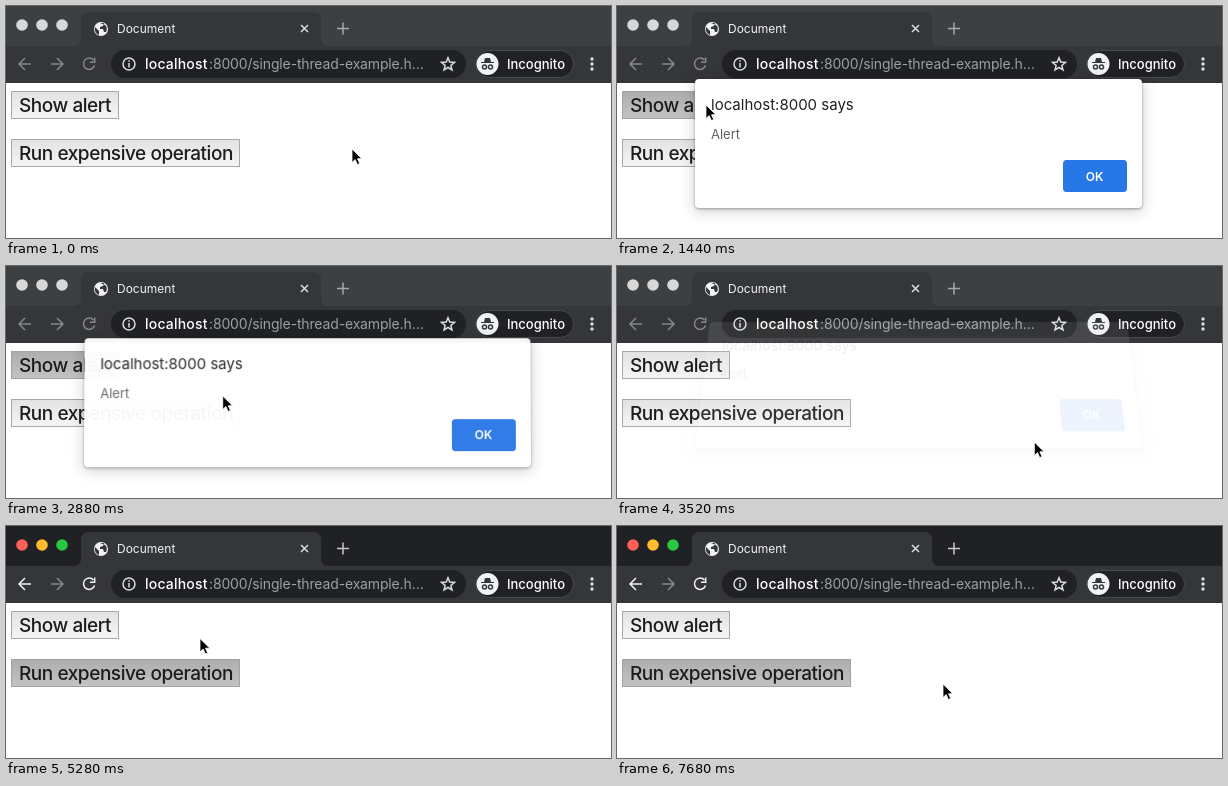
These frames come from a looping animation (605x232 px, 8000 ms). An HTML page:

```html
<!DOCTYPE html>
<html lang="en">
<head>
<meta charset="utf-8">
<title>Blocked page</title>
<style>
  html, body { margin: 0; width: 100%; height: 100%; overflow: hidden; background: #fff; }
  svg { position: absolute; left: 0; top: 0; overflow: visible; }
  text { font-family: Inter, "Open Sans", sans-serif; white-space: pre; }
  .line { fill: none; stroke: #dadce0; stroke-width: 1.5; }
  .bar { fill: #202124; }
  .nav { stroke: #f1f3f4; }
  .dim { stroke: #85878a; }
  .plus { stroke: #c6c8ca; }
  .idle .bar { fill: #3c4043; }
  .idle .nav { stroke: #85878a; }
  .idle .plus { stroke: #a5a8ab; }
  .idle .light { fill: #d8d8d8; }
  .button rect { fill: url(#up); stroke: #a8a8a8; }
  .button.pressed rect { fill: url(#down); stroke: #a2a2a2; }
  .button text { font-size: 19px; font-weight: 450; letter-spacing: -.45px; fill: #1c1c1c; }
  #dialog {
    position: absolute; left: 78px; top: 73px; width: 447px; height: 129px;
    background: #fff; border-radius: 4px; transform-origin: 50% 100%;
    box-shadow: 0 1px 3px rgba(0,0,0,.35), 0 3px 14px 2px rgba(0,0,0,.15);
  }
</style>
</head>
<body>
<svg width="605" height="232">
  <defs>
    <linearGradient id="up" x2="0" y2="1"><stop stop-color="#e2e2e2"/><stop offset="1" stop-color="#f5f5f5"/></linearGradient>
    <linearGradient id="down" x2="0" y2="1"><stop stop-color="#adadad"/><stop offset="1" stop-color="#c3c3c3"/></linearGradient>
    <path id="arrow" d="M6 0H-6M0-6L-6 0 0 6"/>
  </defs>

  <rect class="bar" width="605" height="40"/>
  <circle class="light" cx="16" cy="19" r="5.8" fill="#fe5f57"/>
  <circle class="light" cx="36" cy="19" r="5.8" fill="#febc2e"/>
  <circle class="light" cx="56" cy="19" r="5.8" fill="#28c840"/>
  <path fill="#35363a" d="M67 40Q75 40 75 32V14Q75 6 83 6H307Q315 6 315 14V32Q315 40 323 40H605V77H0V40Z"/>

  <circle cx="95" cy="23" r="7" fill="#f1f3f4"/>
  <path fill="#35363a" d="M89 21L93 25V29Q88 27 89 21ZM94 17H98L97 20 94 21V23H97L98 26H100Q102 21 99 19Z"/>
  <text x="111" y="27" font-size="12" fill="#f1f3f4">Document</text>
  <path class="line" d="M295 19l7 7m0-7l-7 7"/>
  <path class="line plus" d="M331 22.500h12m-6-6v12"/>

  <use class="line nav" href="#arrow" x="19" y="58"/>
  <use class="line dim" href="#arrow" transform="translate(51 58) scale(-1 1)"/>
  <path class="line nav" d="M87.500 54A5.700 5.700 0 1 0 88.600 59.500M88.700 51.500V56.300H84"/>

  <rect x="105" y="44" width="355" height="28" rx="14" fill="#202124"/>
  <circle class="line" cx="123" cy="58" r="6"/>
  <path class="line" d="M123 57v4.500m0-7.200v1.500"/>
  <text x="139" y="63" font-size="14" font-weight="500" letter-spacing=".2" fill="#fff">localhost</text>
  <text x="203" y="63" font-size="14" letter-spacing="-.15" fill="#9aa0a6">:8000/single-thread-example.h…</text>
  <polygon class="line" id="star" transform="translate(442 58.500)"/>

  <rect x="469.500" y="44.500" width="98" height="27" rx="13.500" fill="#202124" stroke="#46484c"/>
  <circle cx="481.500" cy="58" r="11" fill="#f1f3f4"/>
  <path fill="#35363a" d="M478 56l1-4h5l1 4zM475 56h13v1h-13z"/>
  <g class="line" style="stroke: #35363a">
    <circle cx="478.500" cy="61" r="2"/><circle cx="484.500" cy="61" r="2"/>
  </g>
  <text x="501" y="63" font-size="13" font-weight="450" fill="#fff">Incognito</text>
  <path class="line" d="M586 53v11" style="stroke-width: 3.4; stroke-linecap: round; stroke-dasharray: 0 5"/>

  <g class="button" id="show">
    <rect x="5.500" y="85.500" width="107" height="27"/>
    <text x="13" y="106">Show alert</text>
  </g>
  <g class="button" id="run">
    <rect x="5.500" y="133.500" width="228" height="27"/>
    <text x="13" y="154">Run expensive operation</text>
  </g>
</svg>

<div id="dialog">
  <svg width="447" height="129">
    <text x="16" y="31" font-size="15" fill="#202124">localhost:8000 says</text>
    <text x="16" y="60" font-size="13" fill="#5f6368">Alert</text>
    <rect x="368" y="81" width="64" height="32" rx="3.500" fill="#2877e6"/>
    <text x="399.500" y="101.500" font-size="12" font-weight="600" fill="#fff" text-anchor="middle">OK</text>
  </svg>
</div>

<svg width="605" height="232">
  <path id="cursor" stroke="#fff" stroke-width=".8" d="M0 1V14.500L3.200 11.500 5.400 16.500 7.700 15.500 5.500 10.700H9.800Z"/>
</svg>

<script>
const STEP = 160, LOOP = 8000, FADE = 200;
const [show, run, dialog, cursor, star] =
  ['show', 'run', 'dialog', 'cursor', 'star'].map(id => document.getElementById(id));

const rest = { x: 346, y: 142 };
const alerts = [{ open: 1200, close: 2040 }, { open: 2720, close: 3320 }];

// Pointer moves, each easing on from where the last one ended
const moves = [
  { at: 400, ms: 560, x: 89, y: 98 },
  { at: 1440, ms: 480, x: 472, y: 170 },
  { at: 2040, ms: 520, x: 89, y: 102 },
  { at: 2640, ms: 620, x: 472, y: 183 },
  { at: 3320, ms: 680, x: 210, y: 145 },
  { at: 4320, ms: 480, x: 367, y: 125 },
  { at: 4800, ms: 960, x: 21, y: 98 },
  { at: 5760, ms: 320, x: 201, y: 113 },
  { at: 6080, ms: 320, x: 100, y: 104 },
  { at: 6400, ms: 320, x: 71, y: 100 },
  { at: 6880, ms: 800, x: 326, y: 157 }
];

const clamp = k => Math.min(1, Math.max(0, k));
const ease = k => k * k * (3 - 2 * k);

function pointer(t) {
  let { x, y } = rest;
  for (const move of moves) {
    const k = ease(clamp((t - move.at) / move.ms));
    x += (move.x - x) * k;
    y += (move.y - y) * k;
  }
  return [x, y];
}

// The dialog unfolds as it opens and tips back as it closes
function drawDialog(t, { open, close }) {
  const fold = t < close ? (1 - clamp((t - open) / FADE)) ** 2 : clamp((t - close) / FADE);
  dialog.style.opacity = 1 - .91 * fold;
  dialog.style.transform = fold
    ? `translateY(${-20 * fold}px) perspective(300px) rotateX(${9 * fold}deg) scaleY(${1 + .06 * fold})`
    : 'none';
}

function draw(now) {
  const t = Math.floor(now % LOOP / STEP) * STEP;
  const alert = alerts.find(a => t >= a.open && t <= a.close + FADE);

  document.body.classList.toggle('idle', t < STEP || !!alert);
  show.classList.toggle('pressed', alerts.some(a => t >= a.open - STEP && t < a.close));
  run.classList.toggle('pressed', t >= 4160);

  dialog.style.visibility = alert ? 'visible' : 'hidden';
  if (alert) drawDialog(t, alert);

  cursor.setAttribute('transform', `translate(${pointer(t)})`);
  requestAnimationFrame(draw);
}

star.setAttribute('points', Array.from({ length: 10 }, (_, i) => {
  const r = i % 2 ? 3 : 6.8, a = i * Math.PI / 5;
  return [r * Math.sin(a), -r * Math.cos(a)];
}).join(' '));
draw(0);
</script>
</body>
</html>
```
